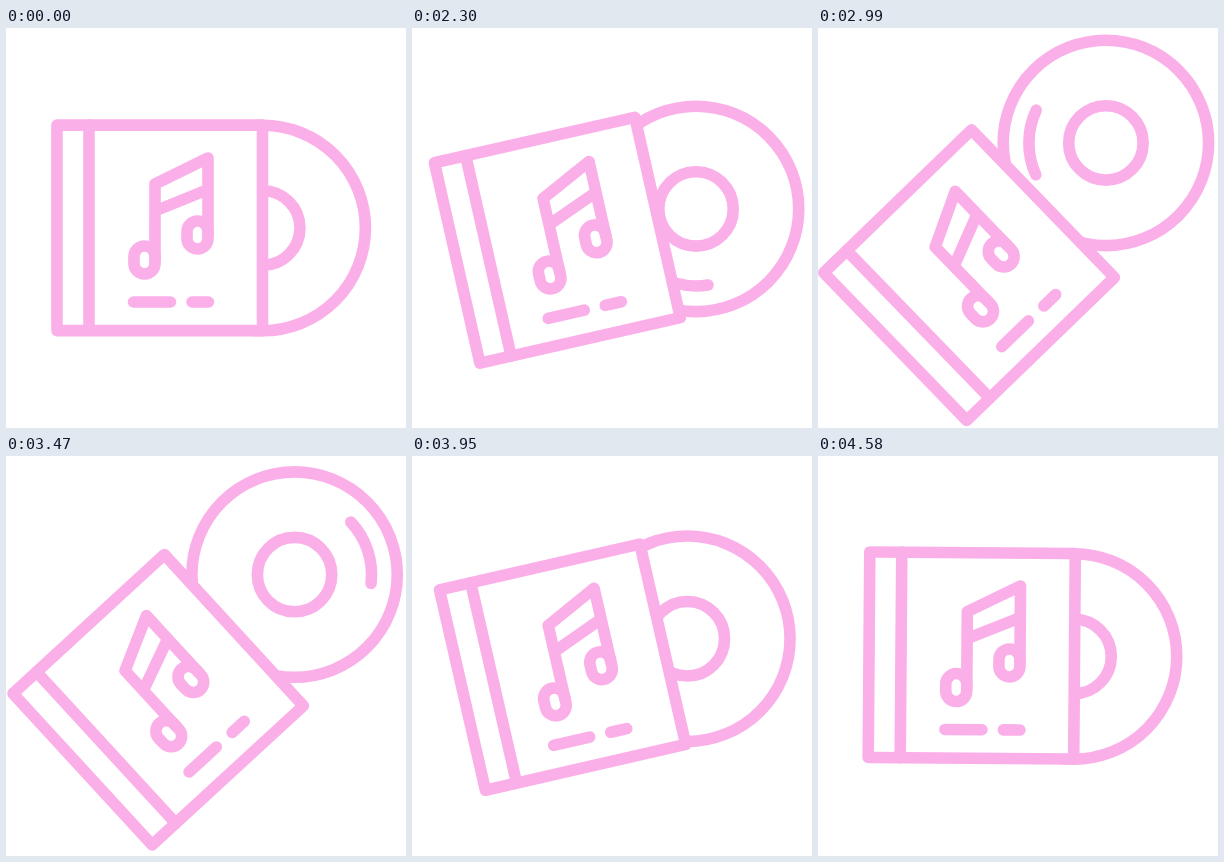
Recreate the animation shown at these times as an HTML page. Size 400 by 400 pixels, loop 4.61 s.

```html
<!DOCTYPE html>
<html lang="en">
<head>
<meta charset="utf-8">
<title>Album</title>
<style>
  html, body { margin: 0; width: 100%; height: 100%; overflow: hidden; background: #fff; }
  svg { display: block; width: 100%; height: 100%; }
  g { fill: none; stroke: #fbafe8; stroke-width: 11.6; stroke-linecap: round; stroke-linejoin: round; }
</style>
</head>
<body>
<svg viewBox="0 0 400 400">
  <g id="disc">
    <circle r="102.7"/>
    <circle r="37.2"/>
    <path id="shine"/>
  </g>
  <g id="box">
    <rect x="51" y="97.1" width="205.5" height="205.5" fill="#fff"/>
    <path d="M83 97V302.5"/>
    <path d="M149 232V156L202 130V207M149 183L202 161.5"/>
    <rect x="128" y="218" width="21" height="28" rx="10.5"/>
    <rect x="181" y="193" width="21" height="28" rx="10.5"/>
    <path d="M127.5 274H164.5M186 274H202.5"/>
  </g>
</svg>
<script>
  const LOOP = 4610, START = 2000, PEAK = 3200, STEP = 30;
  const PIVOT = 200, DISC_OFFSET = 56.7, SHINE_R = 77, SHINE_HALF = 24.8;
  const rad = deg => deg * Math.PI / 180;
  const $ = id => document.getElementById(id);
  const disc = $('disc'), box = $('box'), shine = $('shine');

  function bezier(x1, y1, x2, y2) {
    const at = (u, a, b) => 3 * (1 - u) * (1 - u) * u * a + 3 * (1 - u) * u * u * b + u * u * u;
    return x => {
      if (x <= 0 || x >= 1) return x <= 0 ? 0 : 1;
      let lo = 0, hi = 1;
      for (let i = 0; i < 30; i++) {
        const mid = (lo + hi) / 2;
        if (at(mid, x1, x2) < x) lo = mid; else hi = mid;
      }
      return at(lo, y1, y2);
    };
  }

  // Rises to `max` at PEAK, then returns to zero at LOOP.
  const swing = (max, out, back) => t => max * (t < PEAK
    ? out((t - START) / (PEAK - START))
    : 1 - back((t - PEAK) / (LOOP - PEAK)));

  const soft = bezier(.33, 0, .25, 1);
  const quick = bezier(.25, 0, .15, 1);
  const tilt = swing(45, soft, bezier(.615, 0, .378, 1.3));
  const discSlide = swing(66.7, quick, bezier(.66, 0, .36, 1.3));
  const boxSlide = swing(22, quick, soft);

  const point = deg => `${SHINE_R * Math.cos(rad(deg))} ${SHINE_R * Math.sin(rad(deg))}`;
  shine.setAttribute('d',
    `M${point(-SHINE_HALF)}A${SHINE_R} ${SHINE_R} 0 0 1 ${point(SHINE_HALF)}`);

  function draw(time) {
    let t = time % LOOP;
    t = t < START ? START : START + Math.floor((t - START) / STEP) * STEP;
    const angle = tilt(t);
    const reach = DISC_OFFSET + discSlide(t);
    const x = PIVOT + reach * Math.cos(rad(angle));
    const y = PIVOT - reach * Math.sin(rad(angle));
    const spin = 230 - 1080 * (t - START) / (LOOP - START);
    disc.setAttribute('transform', `translate(${x} ${y})`);
    shine.setAttribute('transform', `rotate(${spin})`);
    box.setAttribute('transform',
      `rotate(${-angle} ${PIVOT} ${PIVOT}) translate(${-boxSlide(t)} 0)`);
  }

  const origin = performance.now();
  function tick() {
    draw(performance.now() - origin);
    requestAnimationFrame(tick);
  }
  tick();
</script>
</body>
</html>
```
